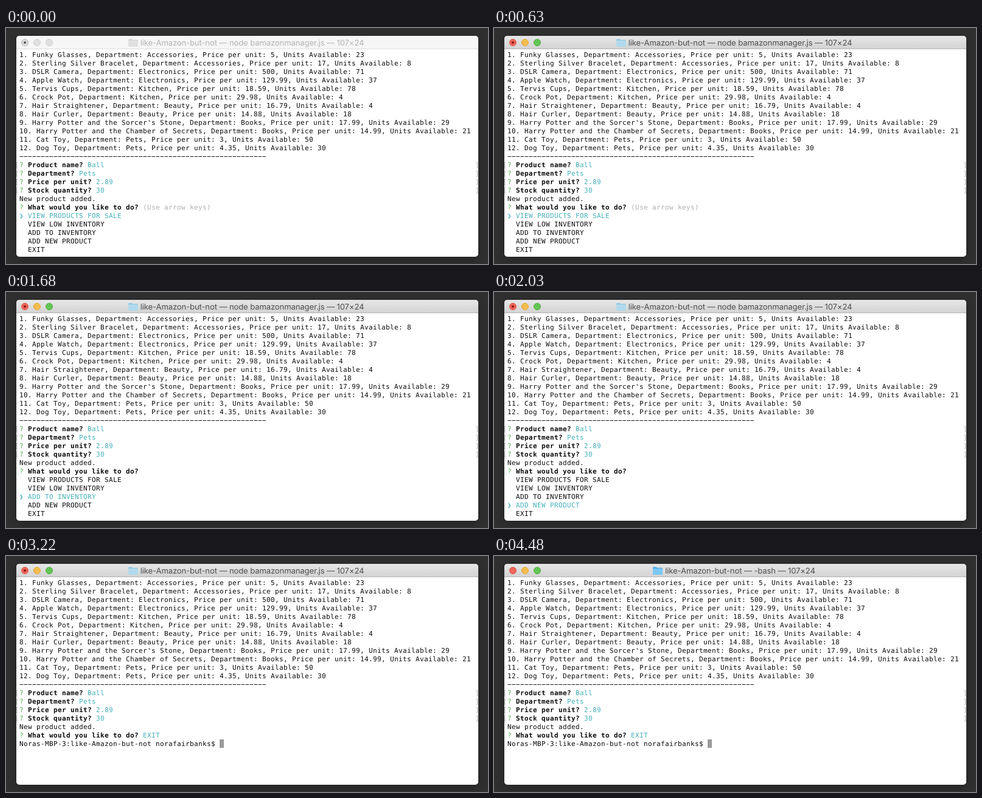
Recreate the animation shown at these times as an HTML page. Size 792 by 390 pixels, loop 4.55 s.

```html
<!DOCTYPE html>
<html lang="en">
<head>
<meta charset="utf-8">
<title>Terminal</title>
<style>
  html, body { margin: 0; width: 100%; height: 100%; overflow: hidden; background: #303030; }
  svg { display: block; width: 792px; height: 390px; }
  text { white-space: pre; text-rendering: geometricPrecision; }
  .term { font: 11px "DejaVu Sans Mono", monospace; letter-spacing: .378px; fill: #0c0c0c; }
  .term .bold { font-weight: 700; }
  .term .cyan { fill: #45b1bb; }
  .term .green { fill: #4fb04f; }
  .term .dim { fill: #b0b0b0; }
  #title { font: 13px Inter, sans-serif; letter-spacing: -.08px; text-anchor: middle; }
</style>
</head>
<body>
<svg viewBox="0 0 792 390" xmlns="http://www.w3.org/2000/svg">
  <defs>
    <linearGradient id="barFill" x2="0" y2="1">
      <stop offset="0" stop-color="#e7e7e7"/>
      <stop offset="1" stop-color="#d2d2d2"/>
    </linearGradient>
    <filter id="blur" x="-10%" y="-15%" width="120%" height="130%">
      <feGaussianBlur stdDeviation="8"/>
    </filter>
    <clipPath id="frame"><rect x="17" y="13" width="759" height="365" rx="5"/></clipPath>
  </defs>
  <rect width="792" height="390" fill="#303030"/>
  <rect x="17" y="17" width="759" height="365" rx="5" fill="#000" opacity=".3" filter="url(#blur)"/>
  <g clip-path="url(#frame)">
    <rect x="17" y="13" width="759" height="365" fill="#fff"/>
    <rect id="bar" x="17" y="13" width="759" height="22"/>
    <rect id="edge" x="17" y="34" width="759" height="1"/>
  </g>
  <g id="lights"></g>
  <g id="folder">
    <path id="back" d="M0 3q0-1.5 1.5-1.5h4l1.5 1.5h7.5q1.5 0 1.5 1.5v8h-16z"/>
    <rect id="front" y="4.5" width="16" height="10" rx="1.2"/>
  </g>
  <text id="title" x="404.5" y="29"></text>
  <g id="fixed" class="term"></g>
  <g id="live" class="term"></g>
</svg>
<script>
const LOOP = 4550, COL = 7, ROW = 14, LEFT = 22, BASE = 48;
const $ = id => document.getElementById(id);

const products = [
  ["Funky Glasses", "Accessories", "5", 23],
  ["Sterling Silver Bracelet", "Accessories", "17", 8],
  ["DSLR Camera", "Electronics", "500", 71],
  ["Apple Watch", "Electronics", "129.99", 37],
  ["Tervis Cups", "Kitchen", "18.59", 78],
  ["Crock Pot", "Kitchen", "29.98", 4],
  ["Hair Straightener", "Beauty", "16.79", 4],
  ["Hair Curler", "Beauty", "14.88", 18],
  ["Harry Potter and the Sorcer's Stone", "Books", "17.99", 29],
  ["Harry Potter and the Chamber of Secrets", "Books", "14.99", 21],
  ["Cat Toy", "Pets", "3", 50],
  ["Dog Toy", "Pets", "4.35", 30]
];
const answers = [
  ["Product name?", "Ball"],
  ["Department?", "Pets"],
  ["Price per unit?", "2.89"],
  ["Stock quantity?", "30"]
];
const menu = ["VIEW PRODUCTS FOR SALE", "VIEW LOW INVENTORY", "ADD TO INVENTORY", "ADD NEW PRODUCT", "EXIT"];
const question = "What would you like to do?";
const folderName = "like-Amazon-but-not";
const prompt = `Noras-MBP-3:${folderName} norafairbanks$ `;

const looks = {
  idle: { bar: "#f6f6f6", edge: "#dedede", text: "#b3b3b3", back: "#d6d6d6", front: "#e0e0e0",
          lights: ["#dddddd", "#e0e0e0", "#e0e0e0"], rims: ["#b4b4b4", "#cccccc", "#cccccc"],
          dot: "#555555", job: "node bamazonmanager.js", x: 201 },
  busy: { bar: "url(#barFill)", edge: "#b4b4b4", text: "#4b4b4b", back: "#98cbe4", front: "#b0d9ed",
          lights: ["#f2665c", "#f6be4f", "#62c554"], rims: ["#d9544b", "#dca53c", "#50ae43"],
          dot: "#7d1712", job: "node bamazonmanager.js", x: 201 }
};
looks.shell = { ...looks.busy, back: "#55b0e6", front: "#7bc8f5", dot: null, job: "-bash", x: 261 };

const escapeText = s => s.replace(/&/g, "&amp;").replace(/</g, "&lt;");
const put = (row, col, str, cls = "") =>
  `<text class="${cls}" x="${LEFT + col * COL}" y="${BASE + row * ROW}">${escapeText(str)}</text>`;
const ask = (row, label, reply = "", cls = "cyan") =>
  put(row, 0, "?", "green") + put(row, 2, label, "bold") + put(row, label.length + 3, reply, cls);

function drawFixed() {
  let out = products.map(([name, dept, price, units], i) =>
    put(i, 0, `${i + 1}. ${name}, Department: ${dept}, Price per unit: ${price}, Units Available: ${units}`)).join("");
  out += put(12, 0, "\u2212".repeat(58));
  answers.forEach(([label, reply], i) => {
    const row = 13 + i;
    out += put(row, -1, "[", "dim") + ask(row, label, reply) + put(row, 107, "]", "dim");
  });
  $("fixed").innerHTML = out + put(17, 0, "New product added.");
}

function drawBar(look) {
  $("bar").setAttribute("fill", look.bar);
  $("edge").setAttribute("fill", look.edge);
  $("back").setAttribute("fill", look.back);
  $("front").setAttribute("fill", look.front);
  $("folder").setAttribute("transform", `translate(${look.x} 16.5)`);
  $("title").setAttribute("fill", look.text);
  $("title").textContent = `${folderName} \u2014 ${look.job} \u2014 107\u00d724`;
  const dot = look.dot ? `<circle cx="31" cy="24" r="2" fill="${look.dot}"/>` : "";
  $("lights").innerHTML = look.lights.map((fill, i) =>
    `<circle cx="${31 + 20 * i}" cy="24" r="5.5" fill="${fill}" stroke="${look.rims[i]}"/>`).join("") + dot;
}

function drawMenu(pick) {
  const hint = pick === 0 ? "(Use arrow keys)" : "";
  $("live").innerHTML = ask(18, question, hint, "dim") + menu.map((item, i) =>
    i === pick ? put(19 + i, 0, "\u276f", "cyan") + put(19 + i, 2, item, "cyan") : put(19 + i, 2, item)).join("");
}

function drawShell() {
  $("live").innerHTML = ask(18, question, "EXIT") + put(19, 0, prompt) +
    `<rect x="${LEFT + prompt.length * COL}" y="303" width="7" height="14" fill="#9b9b9b"/>`;
}

// The selection moves down once every 280 ms.
const pickAt = t => t < 1330 ? 0 : Math.min(4, 1 + Math.floor((t - 1330) / 280));
const lookAt = t => t < 630 ? "idle" : t < 3360 ? "busy" : "shell";

let lastLook, lastPick;
function draw(t) {
  const look = lookAt(t);
  const pick = t < 3220 ? pickAt(t) : "done";
  if (look !== lastLook) drawBar(looks[lastLook = look]);
  if (pick !== lastPick) {
    lastPick = pick;
    pick === "done" ? drawShell() : drawMenu(pick);
  }
}

const start = performance.now();
function tick() {
  draw((performance.now() - start) % LOOP);
  requestAnimationFrame(tick);
}
drawFixed();
draw(0);
requestAnimationFrame(tick);
</script>
</body>
</html>
```
